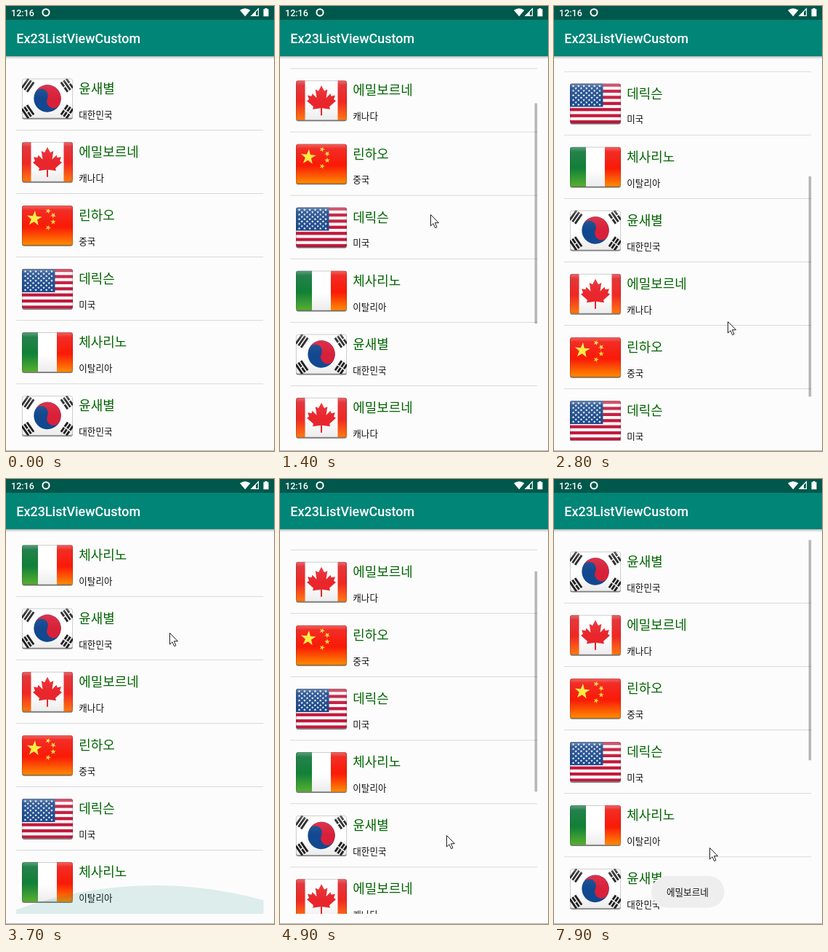
Animation, 369 px wide and 611 px high, one loop 8 s. Source, as an HTML page:

```html
<!DOCTYPE html>
<html lang="ko">
<head>
<meta charset="utf-8">
<style>
html, body { margin: 0; width: 100%; height: 100%; overflow: hidden; background: #fcfcfc; }
svg { display: block; }
.ui { font-family: Roboto, sans-serif; font-weight: 500; fill: #fff; }
.ko { font-family: "Noto Sans CJK KR", "Noto Sans CJK", sans-serif; font-size: 12.56px; fill: #111; }
.name { font-size: 17.94px; font-weight: 500; fill: #006400; }
</style>
</head>
<body>
<svg width="369" height="611" viewBox="0 0 369 611">
  <defs>
    <clipPath id="view"><rect x="14" y="83" width="340.5" height="514"/></clipPath>
    <clipPath id="card"><rect width="70" height="54.5" rx="3"/></clipPath>
    <linearGradient id="shadow" x2="0" y2="1"><stop stop-opacity=".25"/><stop offset="1" stop-opacity="0"/></linearGradient>
    <linearGradient id="gloss" x2="0" y2="1">
      <stop stop-color="#fff" stop-opacity=".35"/><stop offset=".12" stop-color="#fff" stop-opacity=".1"/>
      <stop offset=".5" stop-color="#fff" stop-opacity="0"/>
    </linearGradient>
  </defs>
  <rect width="369" height="611" fill="#fcfcfc"/>
  <g clip-path="url(#view)">
    <g id="list"></g>
    <circle id="bottomGlow" r="560" cx="205" fill="#008577"/>
    <circle id="topGlow" r="560" cx="185" fill="#008577"/>
    <rect id="bar" x="350.6" width="3.7" height="302.5" fill="#000"/>
  </g>
  <rect y="610" width="369" height="1" fill="#b4b4b4"/>
  <rect y="69" width="369" height="4" fill="url(#shadow)"/>
  <rect width="369" height="69" fill="#008577"/>
  <rect width="369" height="19" fill="#00574b"/>
  <g class="ui">
    <text x="14.3" y="51" font-size="17.94">Ex23ListViewCustom</text>
    <text x="7" y="13.5" font-size="12.56">12:16</text>
    <circle cx="55" cy="8.8" r="4.6" fill="none" stroke="#fff" stroke-width="2"/>
    <path d="M322 5.8Q329.2 .6 336.4 5.8L329.2 14.2Z"/>
    <path d="M338 13.3H347.5V3.8Z" fill="none" stroke="#fff" stroke-width="1.2"/>
    <path d="M338 13.3H344V7.3Z"/>
    <path d="M354.5 4.2H356.5V3H359.5V4.2H361.5V14.2H354.5Z"/>
  </g>
  <g id="toast">
    <rect x="134" y="545" width="100.5" height="43.5" rx="21.7" fill="#eee"/>
    <text id="toastText" class="ko" x="155" y="571.6"></text>
  </g>
  <path id="cursor" d="M.5 .5V16L4 12.7 6.7 18.6 9 17.6 6.4 11.7H11.5Z" fill="#fff" stroke="#222"/>
</svg>
<script>
const $ = id => document.getElementById(id);
const ROW = 87.1, TOP = 83.3, BOTTOM = 597, LOOP = 8000;

const rect = (x, y, w, h, fill) => `<rect x="${x}" y="${y}" width="${w}" height="${h}" fill="${fill}"/>`;
const poly = (points, fill) => `<polygon points="${points.join(' ')}" fill="${fill}"/>`;
const star = (x, y, r, turn, fill) => poly([...Array(10).keys()].map(i => {
  const a = (turn - 90 + i * 36) * Math.PI / 180, d = i % 2 ? r * 0.39 : r;
  return [(x + d * Math.cos(a)).toFixed(2), (y + d * Math.sin(a)).toFixed(2)];
}), fill);
const gradient = (id, ...colors) => `<linearGradient id="${id}" gradientUnits="userSpaceOnUse" x1="0" y1="0" x2="0" y2="54.5">` +
  colors.map((c, i) => `<stop offset="${[0, 0.55, 1][i]}" stop-color="${c}"/>`).join('') + '</linearGradient>';

// Three bars of a trigram; digits of the mask mark the broken ones.
const trigram = (x, y, turn, mask) => `<g transform="translate(${x} ${y}) rotate(${turn})">` +
  [...mask].map((broken, i) => rect(-8, i * 4.4 - 5.8, 16, 2.9, '#222') +
    (broken === '1' ? rect(-0.7, i * 4.4 - 6, 1.4, 3.3, '#fff') : '')).join('') + '</g>';

function korea() {
  return rect(0, 0, 70, 55, 'url(#white)') +
    `<g transform="translate(35 27.3) rotate(25)"><circle r="18.7" fill="#12488f"/>
     <path d="M-18.7 0A18.7 18.7 0 0 1 18.7 0A9.35 9.35 0 0 1 0 0A9.35 9.35 0 0 0 -18.7 0Z" fill="#d8203a"/></g>` +
    trigram(8, 9, -55, '000') + trigram(62, 9, 55, '101') +
    trigram(8, 45.5, 55, '010') + trigram(62, 45.5, -55, '111');
}
function canada() {
  const half = [[0, 7], [4, 14.5], [8.3, 12.3], [6.5, 24], [12.5, 18], [13.6, 21.5], [19, 20.5],
    [17, 26], [20, 28], [11, 36], [12, 39.5], [1, 38], [1, 48]];
  const leaf = [...half.map(([x, y]) => [35 + x, y]), ...half.reverse().map(([x, y]) => [35 - x, y])];
  return rect(0, 0, 70, 55, 'url(#white)') + rect(0, 0, 12.5, 55, 'url(#red)') +
    rect(57.5, 0, 12.5, 55, 'url(#red)') + poly(leaf, '#e8262c');
}
function china() {
  return rect(0, 0, 70, 55, 'url(#fire)') + star(17, 18, 11, 5, '#ffec3d') +
    [[36, 7.5, 20], [43, 13.5, 40], [43, 22.5, 0], [36, 30.5, 20]]
      .map(([x, y, turn]) => star(x, y, 4, turn, '#ffd83a')).join('');
}
function usa() {
  let out = rect(0, 0, 70, 55, '#f8f6f6');
  for (let i = 0; i < 13; i += 2) out += rect(0, i * 4.2, 70, 4.2, '#c4183c');
  out += rect(0, 0, 45.5, 32, '#1c4a8c');
  for (let r = 0; r < 9; r++)
    for (let c = 0; c < 6 - r % 2; c++) out += star(4.5 + c * 7.3 + r % 2 * 3.65, 3.4 + r * 3.2, 2, 0, '#fff');
  return out;
}
function italy() {
  return rect(0, 0, 70, 55, 'url(#white)') + rect(0, 0, 22, 55, 'url(#green)') + rect(48, 0, 22, 55, 'url(#fire)');
}

const people = [['윤새별', '대한민국', korea()], ['에밀보르네', '캐나다', canada()], ['린하오', '중국', china()],
  ['데릭슨', '미국', usa()], ['체사리노', '이탈리아', italy()]];

let rows = gradient('white', '#fff', '#fff', '#ececec') + gradient('red', '#dc2028', '#f02a24', '#ff7a10') +
  gradient('fire', '#ee1410', '#fa1c08', '#ff8c00') + gradient('green', '#0a7038', '#138238', '#58b030');
for (let i = 0; i < 10; i++) {
  const [name, country, flag] = people[i % 5];
  rows += `<g transform="translate(0 ${TOP + i * ROW})">
    ${i ? rect(14, -0.5, 340.5, 1, '#d9d9d9') : ''}
    <g transform="translate(22 16.4)">
      <rect y="1.4" width="70" height="54.5" rx="3" fill="#777"/>
      <g clip-path="url(#card)">${flag}${rect(0, 0, 70, 54.5, 'url(#gloss)')}</g>
      <rect x=".4" y=".4" width="69.2" height="53.8" rx="3" fill="none" stroke="#000" stroke-opacity=".25" stroke-width=".8"/>
    </g>
    <text class="ko name" x="100.3" y="36.6">${name}</text>
    <text class="ko" x="100.3" y="70.4">${country}</text></g>`;
}
$('list').innerHTML = rows;
$('toastText').textContent = people[1][0];

// Keys are [time, ...values], joined by straight lines.
const pointer = [[400, 333, 152], [500, 270, 230], [600, 188, 338], [700, 182, 372], [800, 180, 386], [1000, 184, 376],
  [1400, 207, 286], [1900, 217, 206], [2100, 219, 190], [2500, 247, 498], [2600, 247, 498], [2700, 243, 485],
  [3000, 232, 328], [3300, 229, 270], [3700, 225, 211], [4200, 228, 190], [4300, 228, 190], [4400, 228, 202],
  [4900, 229, 489], [5100, 229, 580], [5200, 229, 587], [5400, 226, 585], [5800, 160, 400], [6100, 131, 322],
  [6400, 126, 298], [6600, 137, 230], [7600, 137, 230], [7900, 214, 506]];
const scroll = [[1000, 6], [1400, 84.5], [1900, 175], [2100, 190], [2600, 192], [2700, 203], [3000, 357.5],
  [4300, 357.5], [4400, 350], [4900, 73], [5050, 0]];
const barShown = [[900, 0], [1000, 1], [3300, 1], [3600, 0], [4300, 0], [4400, 1], [5400, 1], [5700, 0], [6700, 0], [6800, 1]];
const pullBottom = [[3000, 0], [3600, 1], [3700, 1], [4200, 0]];
const pullTop = [[5000, 0], [5200, 1], [5400, 1], [5900, 0]];
const toastShown = [[6800, 0], [7400, 1]];

function at(keys, t) {
  const next = keys.findIndex(k => k[0] > t);
  if (next === 0 || next < 0) return keys.at(next).slice(1);
  const a = keys[next - 1], b = keys[next], f = (t - a[0]) / (b[0] - a[0]);
  return a.slice(1).map((v, i) => v + (b[i + 1] - v) * f);
}

function draw(t) {
  const y = t < 1000 ? 0 : at(scroll, t)[0];
  $('list').setAttribute('transform', `translate(0 ${-y})`);
  $('bar').setAttribute('y', 83.7 + y * 0.59);
  $('bar').setAttribute('opacity', 0.28 * at(barShown, t)[0]);
  const low = at(pullBottom, t)[0], high = at(pullTop, t)[0];
  $('bottomGlow').setAttribute('cy', BOTTOM - 39 * low + 560);
  $('bottomGlow').setAttribute('opacity', 0.13 * low);
  $('topGlow').setAttribute('cy', 83 + 39 * high - 560);
  $('topGlow').setAttribute('opacity', 0.13 * high);
  $('toast').setAttribute('opacity', at(toastShown, t)[0]);
  $('cursor').setAttribute('transform', `translate(${at(pointer, t).map(Math.round)})`);
  $('cursor').setAttribute('opacity', t < 400 ? 0 : 1);
}

const start = performance.now();
(function tick() {
  draw(Math.floor((performance.now() - start) % LOOP / 100) * 100);
  requestAnimationFrame(tick);
})();
</script>
</body>
</html>
```
